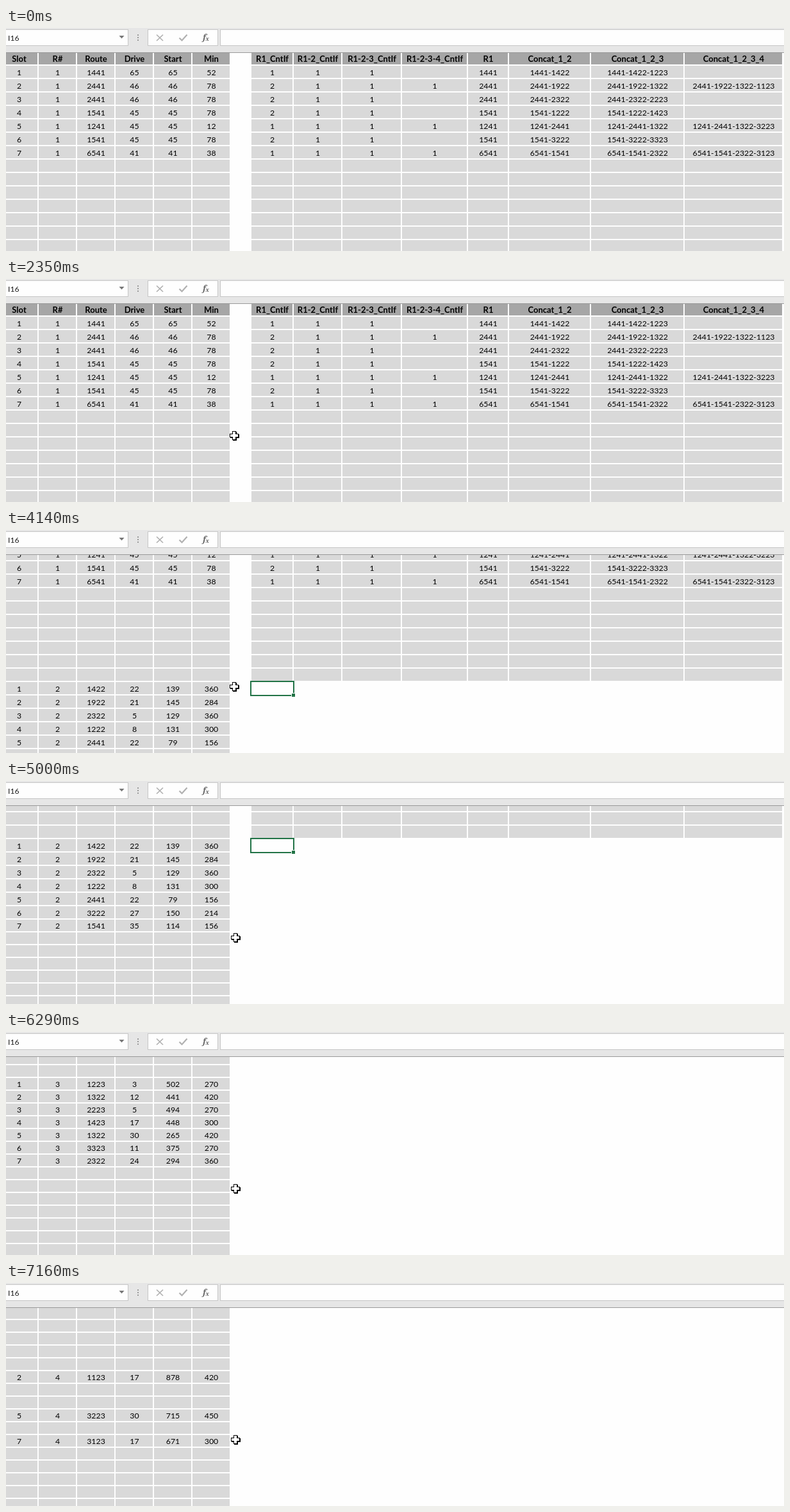
These frames come from a looping animation (1214x349 px, 8 s). An HTML page with a canvas:

```html
<!DOCTYPE html>
<html lang="en">
<head>
<meta charset="utf-8">
<title>Route sheet</title>
<style>
html, body { margin: 0; width: 100%; height: 100%; overflow: hidden; background: #fefefe; }
canvas { display: block; }
</style>
</head>
<body>
<canvas id="stage" width="1214" height="349"></canvas>
<script>
const ctx = document.getElementById('stage').getContext('2d');
const W = 1214, H = 349, LOOP = 8000;
const SHEET_TOP = 37, BLOCK_ROWS = 14, LAST_ROW = 58;
const PAPER = '#fefefe', CELL = '#d9d9d9', HEAD = '#a6a6a6', GREEN = '#217346';
const BODY_FONT = '12.3px Lato, Carlito, sans-serif';
const HEAD_FONT = 'bold 13px Lato, Carlito, sans-serif';

// Columns as "label:width", laid out from a left edge
function columns(x, spec) {
  return spec.split(' ').map(item => {
    const [label, width] = item.split(':');
    const column = { label, x, width: +width };
    x += column.width;
    return column;
  });
}
const leftColumns = columns(-10, 'Slot:60 R#:60 Route:60 Drive:60 Start:60 Min:60');
const rightColumns = columns(382, 'R1_CntIf:66 R1-2_CntIf:76 R1-2-3_CntIf:93 ' +
  'R1-2-3-4_CntIf:103 R1:64 Concat_1_2:128 Concat_1_2_3:146 Concat_1_2_3_4:154');

// Sheet contents: one line per round, one "route drive min" entry per slot
const rounds = `1441 65 52,2441 46 78,2441 46 78,1541 45 78,1241 45 12,1541 45 78,6541 41 38
1422 22 360,1922 21 284,2322 5 360,1222 8 300,2441 22 156,3222 27 214,1541 35 156
1223 3 270,1322 12 420,2223 5 270,1423 17 300,1322 30 420,3323 11 270,2322 24 360
,1123 17 420,,,3223 30 450,,3123 17 300`.split('\n').map(row => row.split(',').map(entry => {
  const [route, drive, min] = entry.split(' ');
  return entry && { route, drive: +drive, min: +min };
}));

// A round starts when the one before has ended and the drive is done
rounds.forEach((round, n) => round.forEach((stop, slot) => {
  const before = n && rounds[n - 1][slot];
  if (stop) stop.start = stop.drive + (before ? before.start + before.min : 0);
}));

// Route chains of each slot through rounds 1 to n, empty if a round is missing
const chains = rounds[0].map((_, slot) => rounds.map((_, n) => {
  const stops = rounds.slice(0, n + 1).map(round => round[slot]);
  return stops.every(Boolean) ? stops.map(stop => stop.route).join('-') : '';
}));

function leftRow(row) {
  if (row === 0) return leftColumns.map(c => c.label);
  const n = Math.floor((row - 1) / BLOCK_ROWS);
  const slot = (row - 1) % BLOCK_ROWS;
  const stop = rounds[n] && rounds[n][slot];
  return stop ? [slot + 1, n + 1, stop.route, stop.drive, stop.start, stop.min] : [];
}

function rightRow(row) {
  if (row === 0) return rightColumns.map(c => c.label);
  const texts = chains[row - 1] || [];
  const counts = texts.map((text, n) => text && chains.filter(c => c[n] === text).length);
  return [...counts, ...texts];
}

const rowTop = row => row * 21 - Math.max(0, row - 21);

// Wheel bursts; each notch glides three rows, and lead is the time already run at the first step
const bursts = [
  { start: 3510, count: 1, gap: 0, lead: 15 },
  { start: 4060, count: 3, gap: 199, lead: 25 },
  { start: 5000, count: 5, gap: 187, lead: 15 },
  { start: 6290, count: 4, gap: 225, lead: 9 }
];
const STEP = 26.5, GLIDE = 180;
const clamp = u => Math.min(1, Math.max(0, u));
const easeOut = u => 1 - (1 - u) ** 2;

function scrollAt(t) {
  let y = 0, row = 0;
  for (const { start, count, gap, lead } of bursts) {
    if (t < start) break;
    const elapsed = Math.floor((t - start) / STEP) * STEP + lead;
    for (let i = 0; i < count; i++, row += 3) {
      y += (rowTop(row + 3) - rowTop(row)) * easeOut(clamp((elapsed - i * gap) / GLIDE));
    }
  }
  return Math.round(y);
}

// Pointer key points: time, x, y
const path = [[20, 1061, 346], [810, 494, 243], [1000, 390, 226], [1250, 293, 232],
  [1640, 345, 252], [1820, 360, 256], [2230, 360, 256], [2350, 356, 245]];

function pointerAt(t) {
  if (t < path[0][0]) return null;
  if (t >= 4830) return [358, 245];
  const i = path.findIndex(p => p[0] > t);
  if (i < 0) return [356, 245];
  const [a, b] = [path[i - 1], path[i]];
  const u = (t - a[0]) / (b[0] - a[0]);
  return [1, 2].map(k => Math.round(a[k] + (b[k] - a[k]) * u));
}

function box(x, y, w, h, fill) {
  ctx.fillStyle = fill;
  ctx.fillRect(x, y, w, h);
}

function line(color, width, ...points) {
  ctx.strokeStyle = color;
  ctx.lineWidth = width;
  ctx.beginPath();
  points.forEach(([x, y]) => ctx.lineTo(x, y));
  ctx.stroke();
}

function drawRow(cols, texts, row, y, height) {
  const head = row === 0;
  ctx.font = head ? HEAD_FONT : BODY_FONT;
  ctx.textAlign = 'center';
  cols.forEach(({ x, width }, i) => {
    box(x + 1, y + 1, width - 2, height - 2, head ? HEAD : CELL);
    if (!texts[i]) return;
    ctx.fillStyle = '#000';
    ctx.fillText(texts[i], x + width / 2 + 0.5, y + height - 5);
  });
}

function drawSelection(y) {
  ctx.strokeStyle = GREEN;
  ctx.lineWidth = 2;
  ctx.strokeRect(382, y, 67, 22);
  box(445, y + 18, 7, 7, PAPER);
  box(446, y + 19, 5, 5, GREEN);
}

function drawSheet(scroll) {
  for (let row = 0; row < LAST_ROW; row++) {
    const y = SHEET_TOP + rowTop(row) - scroll;
    const height = rowTop(row + 1) - rowTop(row);
    if (y + height < SHEET_TOP || y > H) continue;
    drawRow(leftColumns, leftRow(row), row, y, height);
    if (row <= BLOCK_ROWS) drawRow(rightColumns, rightRow(row), row, y, height);
  }
  drawSelection(SHEET_TOP + rowTop(BLOCK_ROWS + 1) - scroll);
}

function field(x, w) {
  box(x, 2, w, 26, PAPER);
  ctx.strokeStyle = '#c6c6c6';
  ctx.lineWidth = 1;
  ctx.strokeRect(x + 0.5, 2.5, w - 1, 25);
}

function drawBar() {
  box(0, 0, W, 38, '#e6e6e6');
  box(0, 38, W, 1, '#999');
  field(-1, 192);
  field(221, 110);
  field(334, 882);

  ctx.textAlign = 'left';
  ctx.font = BODY_FONT;
  ctx.fillStyle = '#222';
  ctx.fillText('I16', 3, 20);

  ctx.fillStyle = '#777';
  ctx.beginPath();
  ctx.moveTo(176.5, 12);
  ctx.lineTo(184.5, 12);
  ctx.lineTo(180.5, 16.5);
  ctx.fill();
  for (const y of [10, 14, 18]) box(205, y, 2, 2, '#999');

  line('#b0b0b0', 1.7, [235, 10.5], [245, 20]);
  line('#b0b0b0', 1.7, [245, 10.5], [235, 20]);
  line('#b0b0b0', 2.2, [270.5, 15.5], [274.5, 19.5], [282.5, 10.5]);

  ctx.fillStyle = '#666';
  ctx.font = 'italic bold 13px "Noto Serif", serif';
  ctx.fillText('f', 307, 19);
  ctx.font = 'italic bold 9px "Noto Serif", serif';
  ctx.fillText('x', 311.5, 20);
}

function plus(x, y, reach, half, color) {
  box(x - reach, y - half, 2 * reach, 2 * half, color);
  box(x - half, y - reach, 2 * half, 2 * reach, color);
}

function drawPointer([x, y]) {
  plus(x + 1, y + 1, 7, 3, '#000');
  plus(x, y, 7, 3, '#000');
  plus(x, y, 6, 2, '#fff');
}

function draw(t) {
  box(0, 0, W, H, PAPER);
  drawSheet(scrollAt(t));
  drawBar();
  const pointer = pointerAt(t);
  if (pointer) drawPointer(pointer);
}

const begin = performance.now();
function tick() {
  draw((performance.now() - begin) % LOOP);
  requestAnimationFrame(tick);
}
tick();
</script>
</body>
</html>
```
